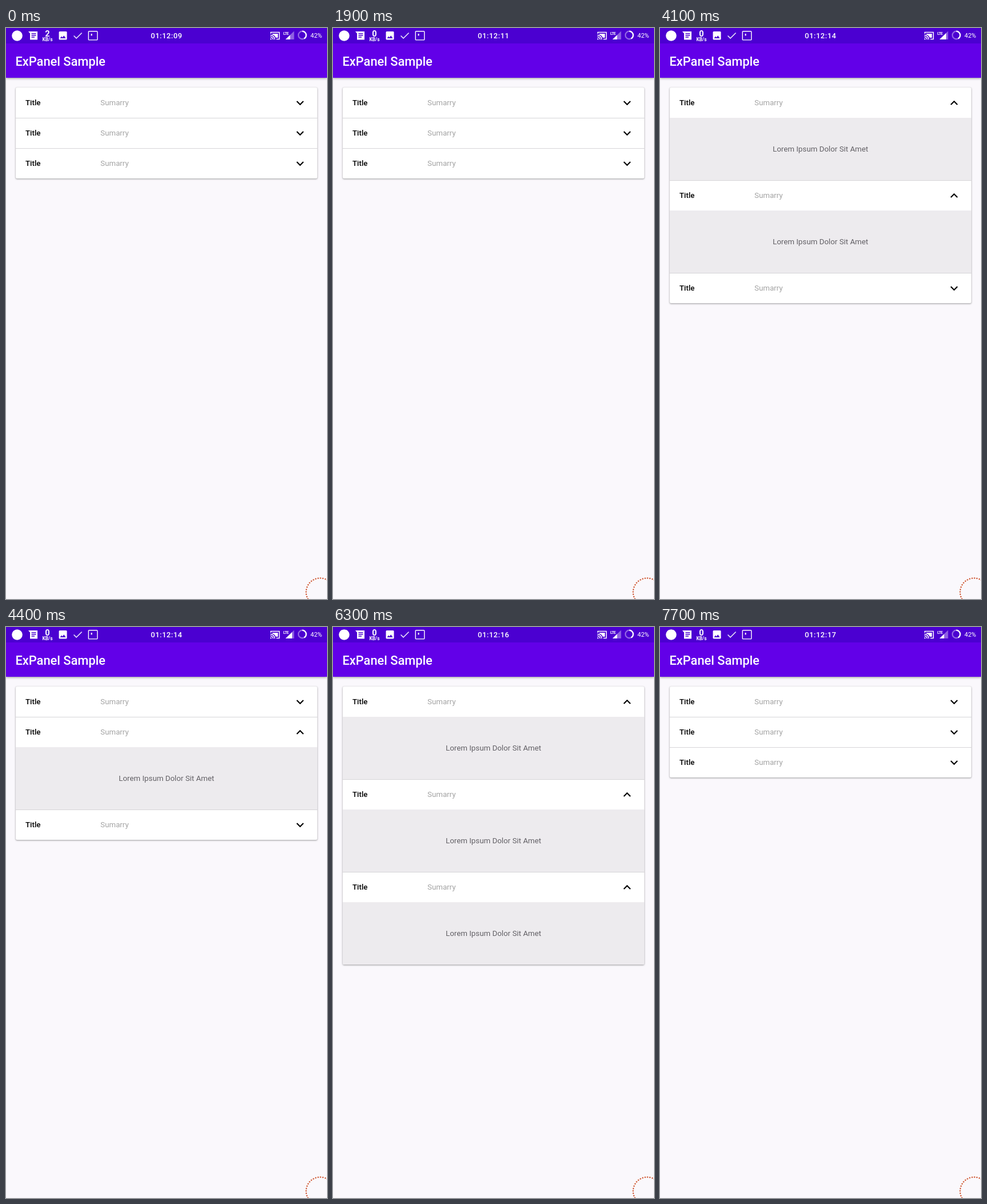
Write an HTML page that moves like this. It is 561 by 998 pixels and loops after 8000 ms.

```html
<!DOCTYPE html>
<html lang="en">
<head>
<meta charset="utf-8">
<title>Expansion panels</title>
<style>
  html, body { margin: 0; width: 100%; height: 100%; overflow: hidden; background: #faf8fc; }
  body { position: relative; font: 13.3px Roboto, sans-serif; }
  svg { position: absolute; left: 0; top: 0; }
  .bar {
    position: absolute; left: 0; top: 0; width: 561px; height: 87px;
    background: linear-gradient(#4b00d1 27px, #6200e8 27px);
    box-shadow: 0 1px 4px rgba(0, 0, 0, .42);
  }
  .card {
    position: absolute; left: 17px; top: 104px; width: 527px; overflow: hidden;
    border-radius: 2px; background: #fff;
    box-shadow: 0 1px 3px rgba(0, 0, 0, .38), 0 0 1px rgba(0, 0, 0, .2);
  }
  .head { position: relative; height: 53px; line-height: 54px; box-sizing: border-box; white-space: nowrap; }
  .row + .row .head { box-shadow: inset 0 1px #d6d5d8; }
  .head b { position: absolute; left: 17px; font-weight: 500; color: #000; }
  .head span { position: absolute; left: 148px; color: #a3a3a3; }
  .head svg { left: 484px; top: 14px; }
  .body { height: 0; overflow: hidden; background: #edebee; }
  .body p { margin: 0; height: 109px; line-height: 109px; text-align: center; color: #636166; }
</style>
</head>
<body>
<div class="bar"></div>
<svg width="561" height="998" viewBox="0 0 561 998" fill="#fff">
  <circle cx="19.5" cy="13.5" r="9.3"/>
  <path d="M39 6H55V20.5H42V9.5Z"/>
  <path d="M44.5 10H52.5M44.5 13H52.5M44.5 16H50" stroke="#4b00d1" stroke-width="1.3"/>
  <g text-anchor="middle" font-weight="700">
    <text id="speed" x="72.5" y="15" font-size="14.5"></text>
    <text x="72.5" y="22.5" font-size="8.3">KB/s</text>
  </g>
  <path fill-rule="evenodd" d="M94 6H105Q106.500 6 106.500 7.500V19Q106.500 20.500 105 20.500H94Q92.500 20.500 92.500 19V7.500Q92.500 6 94 6ZM94.500 18H104.500L101.200 13.300 98.700 16.500 97 14.500Z"/>
  <path d="M118.500 13.500L123 18 132.500 8.500" fill="none" stroke="#fff" stroke-width="1.4"/>
  <rect x="144.200" y="5.700" width="15.500" height="15.200" rx="1" fill="none" stroke="#fff" stroke-width="1.4"/>
  <rect x="148.500" y="10" width="2" height="3.500"/>
  <text id="clock" x="253" y="18" font-size="13" font-weight="500" letter-spacing=".5"></text>
  <g fill="none" stroke="#fff" stroke-width="1.500">
    <path d="M462.800 10V7.500H477.700V19.500H472.500"/>
    <path d="M462 12.600A7.700 7.700 0 0 1 469.700 20.300M462 15.500A4.800 4.800 0 0 1 466.800 20.300"/>
  </g>
  <path d="M462 18V20.300H464.300A2.300 2.300 0 0 0 462 18Z"/>
  <path d="M465.500 10H475.200V17H471.500A10 10 0 0 0 465.500 11.500Z"/>
  <path d="M503.500 5.500V20H488.500Z" opacity=".38"/>
  <path id="signal"/>
  <text x="484.500" y="11.500" font-size="7.500" font-weight="500" letter-spacing="-1" stroke="#4b00d1" stroke-width="1.500" paint-order="stroke">LTE</text>
  <g fill="none" stroke="#fff" stroke-width="2.200">
    <circle cx="517.800" cy="12.500" r="6.800" opacity=".4"/>
    <circle cx="517.800" cy="12.500" r="6.800" pathLength="100" stroke-dasharray="42 58" transform="rotate(-90 517.8 12.5)"/>
  </g>
  <text x="532" y="17" font-size="11">42%</text>
  <text x="16.500" y="65.700" font-size="21.800" font-weight="500">ExPanel Sample</text>
  <circle cx="549" cy="986" r="24.500" fill="none" stroke="#cf5631" stroke-width="2.500" stroke-linecap="round" stroke-dasharray="0 4.275"/>
</svg>
<div class="card"></div>
<script>
  const LOOP = 8000, STEP = 100, MOVE = 178, BODY = 109;

  // Start times of each panel's toggles: open, close, open...
  const toggles = [
    [2350, 4200, 5700, 7450],
    [3050, 6350],
    [200, 1650, 4850, 6950]
  ];
  // [from ms, KB/s]
  const speeds = [[0, 2], [1100, 0], [2100, 165], [3100, 28], [4100, 0]];

  const $ = id => document.getElementById(id);
  const card = document.querySelector('.card');

  const rows = toggles.map(times => {
    const row = document.createElement('div');
    row.className = 'row';
    row.innerHTML = `<div class="head"><b>Title</b><span>Sumarry</span>
      <svg width="26" height="26" viewBox="0 0 24 24">
        <path d="M16.590 8.590L12 13.170 7.410 8.590 6 10l6 6 6-6z"/>
      </svg></div><div class="body"><p>Lorem Ipsum Dolor Sit Amet</p></div>`;
    card.append(row);
    return { times, body: row.querySelector('.body'), arrow: row.querySelector('path') };
  });

  const ease = x => (1 - Math.cos(Math.PI * Math.min(1, Math.max(0, x)))) / 2;

  const openness = (times, t) =>
    times.reduce((sum, at, i) => sum + (i % 2 ? -1 : 1) * ease((t - at) / MOVE), 0);

  function draw(t) {
    for (const { times, body, arrow } of rows) {
      const k = openness(times, t);
      body.style.height = Math.round(k * BODY) + 'px';
      arrow.setAttribute('transform', `rotate(${k * 180} 12 12)`);
    }
    const speed = speeds.filter(s => s[0] <= t).pop()[1];
    $('speed').textContent = speed;
    $('speed').setAttribute('letter-spacing', speed > 99 ? -1.7 : 0);

    const sec = 9 + Math.floor((t + 900) / 1000);
    $('clock').textContent = '01:12:' + String(sec).padStart(2, '0');

    const edge = t >= 2100 && t < 4900 ? 500 : 496.5;
    const top = 20 - (edge - 488.5) * 14.5 / 15;
    $('signal').setAttribute('d', `M${edge} ${top}V20H488.5Z`);
  }

  // The screen refreshes ten times a second.
  const start = performance.now();
  function tick() {
    const t = (performance.now() - start) % LOOP;
    draw(Math.floor(t / STEP) * STEP);
    requestAnimationFrame(tick);
  }
  draw(0);
  requestAnimationFrame(tick);
</script>
</body>
</html>
```
